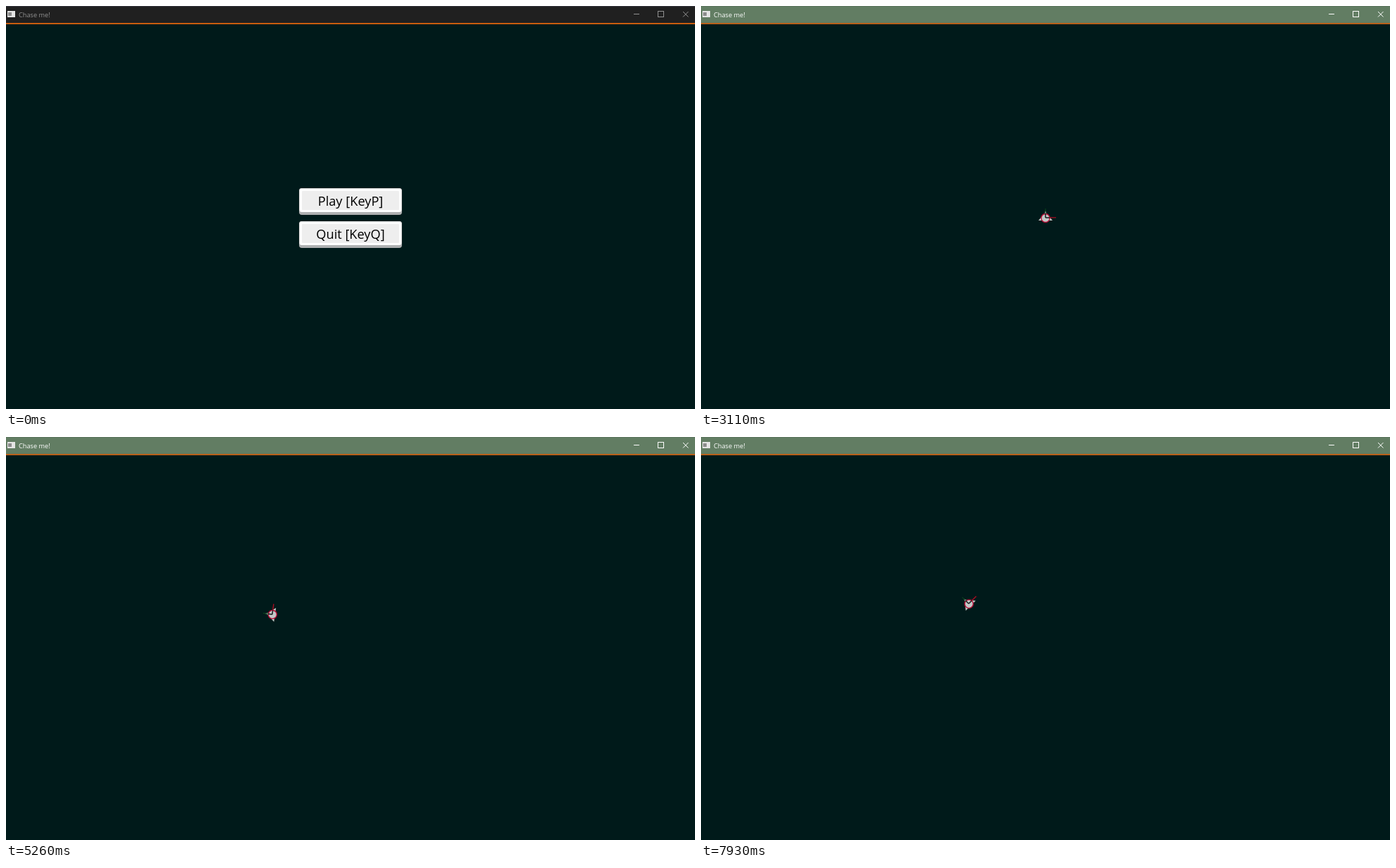
An HTML page with a canvas that plays this animation: 978x573 px, repeating every 8 s.

```html
<!DOCTYPE html>
<html lang="en">
<head>
<meta charset="utf-8">
<title>Chase me!</title>
<style>
  html, body { margin: 0; width: 100%; height: 100%; overflow: hidden; background: #001a1a; }
  canvas { display: block; }
</style>
</head>
<body>
<canvas id="stage" width="978" height="573"></canvas>
<script>
const ctx = document.getElementById('stage').getContext('2d');
const LOOP = 8000, FOCUS = 1370, GAME = 1500, START = 3110, LEG = 800;
const FONT = '"Open Sans", "Noto Sans", sans-serif';

const help = ['Use arrows to move the player.', 'Escape the enemies.',
  'Press any key to start.', '(Optionally, press esc to pause.)'];

// Waypoints one LEG apart; heading in degrees left of "up", speed in px per LEG
const waypoints = [
  { x: 489, y: 301, heading: 0, speed: 60 },
  { x: 452, y: 264, heading: 79, speed: 65 },
  { x: 393, y: 255, heading: 80, speed: 55 },
  { x: 340, y: 247, heading: 82, speed: 200 },
  { x: 268, y: 249, heading: 220, speed: 200 },
  { x: 440, y: 363, heading: 262, speed: 200 },
  { x: 380, y: 237, heading: 405, speed: 200 }];

function rect(x, y, w, h, color) {
  ctx.fillStyle = color;
  ctx.fillRect(x, y, w, h);
}

function roundRect(x, y, w, h, r, color) {
  ctx.fillStyle = color;
  ctx.beginPath();
  ctx.roundRect(x, y, w, h, r);
  ctx.fill();
}

function circle(x, y, r, color) {
  ctx.fillStyle = color;
  ctx.beginPath();
  ctx.arc(x, y, r, 0, 2 * Math.PI);
  ctx.fill();
}

function triangle(x1, y1, x2, y2, x3, y3, color) {
  ctx.fillStyle = color;
  ctx.beginPath();
  ctx.moveTo(x1, y1);
  ctx.lineTo(x2, y2);
  ctx.lineTo(x3, y3);
  ctx.closePath();
  ctx.fill();
}

function line(x1, y1, x2, y2, color, width = 1) {
  ctx.strokeStyle = color;
  ctx.lineWidth = width;
  ctx.beginPath();
  ctx.moveTo(x1, y1);
  ctx.lineTo(x2, y2);
  ctx.stroke();
}

function text(str, x, y, size, color, align = 'center') {
  ctx.font = `${size}px ${FONT}`;
  ctx.textAlign = align;
  ctx.fillStyle = color;
  ctx.fillText(str, x, y);
}

function titleBar(focused) {
  const ink = focused ? '#fff' : '#929292';
  rect(0, 0, 978, 24, focused ? '#627d63' : '#202020');
  rect(0, 0, 978, 1, focused ? '#5b745d' : '#34343c');
  rect(0, 24, 978, 2, focused ? '#b85f1a' : '#c95c0e');
  rect(2, 7, 11, 9, '#e4e4e4');
  rect(3, 9, 5, 5, '#8c8c8c');
  text('Chase me!', 18, 16, 9.2, ink, 'left');
  line(891, 11.5, 899, 11.5, ink);
  ctx.strokeRect(925.5, 7.5, 8, 8);
  line(961, 8, 968.5, 15.5, ink);
  line(968.5, 8, 961, 15.5, ink);
}

function button(label, y, hover) {
  roundRect(416, y, 146, 38, 4, '#aeb0b1');
  roundRect(416, y, 146, 34, 4, '#d6d6d6');
  roundRect(417, y + 1, 144, 33, 3, '#fff');
  roundRect(420, y + 4, 138, 27, 1, '#eee');
  if (hover) roundRect(416, y, 146, 38, 4, 'rgba(0, 0, 0, .2)');
  text(label, 489, y + 25, 18.2, '#000');
}

function cursor(x, y) {
  circle(x, y, 9.5, 'rgba(236, 228, 40, .75)');
  line(x + 3, y + 7, x + 6, y + 14, '#fff', 2.5);
  triangle(x, y - 1, x, y + 12, x + 9, y + 8.5, '#fff');
  ctx.strokeStyle = '#222';
  ctx.lineWidth = .8;
  ctx.stroke();
}

function menu(t) {
  const p = Math.min(1, Math.max(0, (t - 120) / 760));
  const ease = p * p * (3 - 2 * p);
  const x = 917 - 427 * ease, y = 529 - 252 * ease;
  const inside = top => t >= 120 && Math.abs(x - 489) < 73 && y > top && y < top + 38;
  button('Play [KeyP]', 259, inside(259));
  button('Quit [KeyQ]', 306, inside(306));
  if (t >= 120) cursor(x, y);
}

function velocity({ heading, speed }) {
  const a = heading * Math.PI / 180;
  return { x: -speed * Math.sin(a), y: -speed * Math.cos(a) };
}

// Hermite curve between waypoints; the ship points along its motion
function pose(t) {
  const legs = Math.min(waypoints.length - 1, Math.max(0, (t - START) / LEG));
  const i = Math.min(waypoints.length - 2, Math.floor(legs)), u = legs - i, v = 1 - u;
  const a = waypoints[i], b = waypoints[i + 1], va = velocity(a), vb = velocity(b);
  const at = k => a[k] + (b[k] - a[k]) * u * u * (3 - 2 * u) + va[k] * u * v * v - vb[k] * u * u * v;
  const slope = k => 6 * (b[k] - a[k]) * u * v + va[k] * v * (1 - 3 * u) + vb[k] * u * (3 * u - 2);
  return { x: at('x'), y: at('y'), turn: Math.atan2(slope('x'), -slope('y')) };
}

function ship(t) {
  const { x, y, turn } = pose(t);
  ctx.save();
  ctx.translate(x, y);
  ctx.rotate(turn);
  for (const side of [-1, 1]) triangle(side * 10, 4, side * 5, -2, side * 3, 4, '#c4c8c6');
  triangle(-2, -4, 0, -10, 2, -4, '#d8dcda');
  circle(0, .5, 6, '#c4c7c7');
  ctx.strokeStyle = '#b81038';
  ctx.lineWidth = 1.4;
  ctx.stroke();
  line(0, 0, 6, 0, '#151c1c', 1.5);
  line(0, 0, 0, -6, '#151c1c', 1.5);
  line(6, 0, 15, 0, '#a80c22', 1.4);
  line(0, -6, 0, -13, '#0b4a1c');
  ctx.restore();
}

function draw(now) {
  const t = now % LOOP;
  rect(0, 0, 978, 573, '#001a1a');
  titleBar(t >= FOCUS);
  if (t < GAME) menu(t);
  else {
    if (t < START) help.forEach((s, i) => text(s, 489, 204 + i * 78.67, 51.2, '#fff'));
    ship(t);
  }
  requestAnimationFrame(draw);
}
requestAnimationFrame(draw);
</script>
</body>
</html>
```
